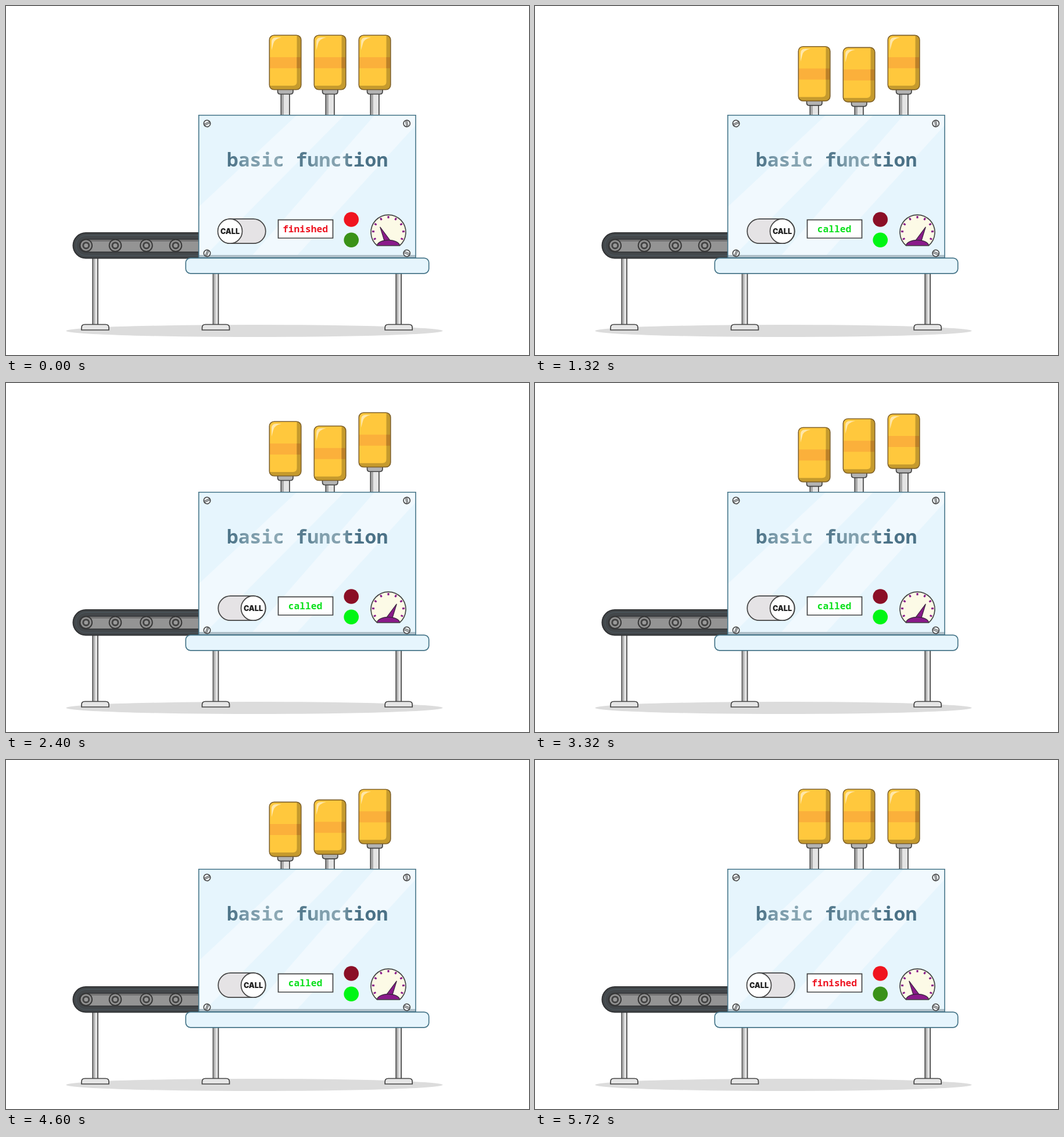
An HTML page for the animation above (6360 ms loop, 900 by 600 pixels).

```html
<!DOCTYPE html>
<html lang="en">
<head>
<meta charset="utf-8">
<title>Basic function machine</title>
<style>
html, body { margin: 0; width: 100%; height: 100%; overflow: hidden; background: #fff; }
svg { display: block; width: 900px; height: 600px; }
.ink { stroke: #444; stroke-width: 1.7; }
.mono { font-family: "Noto Sans Mono", "DejaVu Sans Mono", monospace; font-weight: 700; }
.call { font: 900 12.6px Inter, "Liberation Sans", sans-serif; fill: #222; }
.mid { text-anchor: middle; }
</style>
</head>
<body>
<svg viewBox="0 0 900 600" xmlns="http://www.w3.org/2000/svg">
  <defs>
    <linearGradient id="sheen" gradientUnits="userSpaceOnUse" x1="381" x2="657" y1="250" y2="250">
      <stop offset="0" stop-color="#4b7287"/>
      <stop offset=".06" stop-color="#587d90"/>
      <stop offset=".1" stop-color="#7798a8"/>
      <stop offset=".32" stop-color="#8eaab6"/>
      <stop offset=".36" stop-color="#547a8d"/>
      <stop offset=".5" stop-color="#587d90"/>
      <stop offset=".56" stop-color="#7f9eac"/>
      <stop offset=".72" stop-color="#86a3b0"/>
      <stop offset=".77" stop-color="#4b7287"/>
    </linearGradient>
    <clipPath id="panelClip"><path d="M332 188H705V433H332Z"/></clipPath>
    <clipPath id="dialClip"><path d="M620 350H700V412H620Z"/></clipPath>
    <clipPath id="canClip"><rect x="453" y="50" width="55" height="94" rx="8"/></clipPath>

    <g id="piston">
      <rect class="ink" x="473.3" y="150" width="14.6" height="80" fill="#e4e4e4"/>
      <path d="M474 151h4v78h-4z" fill="#aaa"/>
      <path class="ink" d="M467.5 143h26.500v4q0 4.500-4.500 4.500h-17.500q-4.500 0-4.500-4.500z" fill="#b3b3b3"/>
      <g clip-path="url(#canClip)">
        <path d="M453 50h55v94h-55z" fill="#ffc83d"/>
        <path d="M453 88h55v19h-55z" fill="#fbb03b"/>
        <path d="M500.500 50h7.500v94h-55v-7h41q6.500 0 6.500-6.500z" fill="#c59a2d"/>
        <path d="M500.500 88h7.500v19h-7.500z" fill="#bd8128"/>
        <path d="M457 76v-14q0-8 8-8h9q-13 3-14 11z" fill="#ffe7a8"/>
      </g>
      <rect x="453.300" y="50.300" width="54.500" height="93.500" rx="8" fill="none" stroke="#7f612a" stroke-width="1.6"/>
    </g>

    <g id="foot">
      <path class="ink" d="M-23.500 10v-4q0-5.500 5.500-5.500h36q5.500 0 5.500 5.500v4z" fill="#e6e6e6"/>
    </g>
    <g id="leg">
      <path class="ink" d="M-4.500-90h9V1h-9z" fill="#e3e3e3"/>
      <path d="M-3.600-90h3V0h-3z" fill="#b2b2b2"/>
      <use href="#foot"/>
    </g>
    <g id="roller">
      <circle r="10.300" fill="#929292" stroke="#393939" stroke-width="2"/>
      <circle r="5" fill="#999" stroke="#444" stroke-width="3"/>
    </g>
    <g id="screw">
      <circle r="5.700" fill="#eef3f6" stroke="#444" stroke-width="1.600"/>
      <path d="M-5-1.100H5M-5 1.100H5" stroke="#444" stroke-width="1.100"/>
    </g>
  </defs>

  <ellipse cx="427.500" cy="558.500" rx="324" ry="10.500" fill="#dcdcdc"/>

  <path class="ink" d="M149.300 430h8.700v118h-8.700z" fill="#e3e3e3"/>
  <path d="M150.200 430h3v117h-3z" fill="#b2b2b2"/>
  <use href="#foot" x="153.500" y="547"/>
  <use href="#leg" x="361" y="547"/>
  <use href="#leg" x="675.700" y="547"/>

  <rect x="115.500" y="390" width="250" height="43.500" rx="21.700" fill="#43474a" stroke="#303234" stroke-width="2"/>
  <rect x="120.500" y="394.500" width="250" height="34.500" rx="17" fill="none" stroke="#4d5960" stroke-width="1"/>
  <rect x="126.500" y="401" width="250" height="22" rx="11" fill="#949494" stroke="#303234" stroke-width="1.600"/>
  <path d="M138 402h200v3h-200z" fill="#757575"/>
  <use href="#roller" x="137.800" y="411.700"/>
  <use href="#roller" x="188" y="411.700"/>
  <use href="#roller" x="241.500" y="411.700"/>
  <use href="#roller" x="292" y="411.700"/>

  <use class="piston" href="#piston"/>
  <use class="piston" href="#piston" x="77"/>
  <use class="piston" href="#piston" x="154"/>

  <g clip-path="url(#panelClip)">
    <path d="M332 188H705V433H332Z" fill="#e6f5fd"/>
    <path d="M500 188H582L332 440V345ZM634 188H705V205L497 433H420Z" fill="#f1f9fe"/>
    <path d="M332 428H705V433H332Z" fill="#aebfc8"/>
  </g>
  <path d="M331.700 187.700H705V433H331.700Z" fill="none" stroke="#457488" stroke-width="1.600"/>
  <rect x="309.300" y="433.300" width="418.400" height="26.500" rx="8" fill="#e6f5fd" stroke="#457488" stroke-width="1.700"/>

  <use href="#screw" transform="translate(346 202) rotate(-25)"/>
  <use href="#screw" transform="translate(689.700 202) rotate(78)"/>
  <use href="#screw" transform="translate(346 425) rotate(-68)"/>
  <use href="#screw" transform="translate(689.700 425) rotate(22)"/>

  <text class="mono" x="380" y="275.500" font-size="33" fill="url(#sheen)">basic function</text>

  <rect class="ink" x="365.200" y="366.200" width="81.600" height="42" rx="21" fill="#e5e3e5"/>
  <g id="knob">
    <circle class="ink" cx="385.500" cy="387.200" r="21" fill="#fff"/>
    <text class="call mid" x="385.500" y="391.700">CALL</text>
  </g>

  <path class="ink" d="M468.500 367.700H562.500V399H468.500Z" fill="#fff"/>
  <text id="status" class="mono mid" x="515" y="389" font-size="16.200"></text>

  <circle id="red" cx="594.200" cy="367" r="12.800"/>
  <circle id="green" cx="594.200" cy="402.300" r="12.800"/>

  <path d="M638.700 412A30 30 0 1 1 677.300 412Z" fill="#fcfae6"/>
  <g id="ticks" fill="#8a1a8a"></g>
  <g clip-path="url(#dialClip)">
    <path id="needle" d="M658 376.500L663.500 408H652.500Z" fill="#8a1a8a" stroke="#3d2440" stroke-width="1.200"/>
    <ellipse cx="658" cy="412.500" rx="19.500" ry="10" fill="#8a1a8a" stroke="#3d2440" stroke-width="1.300"/>
  </g>
  <path class="ink" d="M638.700 412A30 30 0 1 1 677.300 412Z" fill="none"/>
</svg>
<script>
const LOOP = 6360, CYCLES = 4, TRAVEL = 27;
const $ = id => document.getElementById(id);
const pistons = document.querySelectorAll('.piston');
const lags = [0, 1 / 3, -1 / 3];

for (let a = -116; a <= 116; a += 29) {
  $('ticks').insertAdjacentHTML('beforeend',
    `<rect x="656.5" y="361" width="3" height="4" transform="rotate(${a} 658 389)"/>`);
}

const clamp = (v, lo, hi) => Math.min(hi, Math.max(lo, v));
const ease = (t, start, length) => (1 - Math.cos(Math.PI * clamp((t - start) / length, 0, 1))) / 2;
// Rises at the first time, falls back at the second.
const pulse = (t, on, off, length) => ease(t, on, length) - ease(t, off, length);
const mix = (a, b, k) => `rgb(${a.map((v, i) => Math.round(v + (b[i] - v) * k))})`;

// The stroke rate drops slightly over the run.
function phase(t) {
  const u = (t - 3100) / 1000;
  return 2.36 + 0.8955 * u - 0.028 * u * u;
}

function draw(t) {
  pistons.forEach((p, i) => {
    const turn = clamp(phase(t) - lags[i], 0, CYCLES);
    p.setAttribute('transform', `translate(0 ${TRAVEL * Math.sin(Math.PI * turn) ** 2})`);
  });
  $('knob').setAttribute('transform', `translate(${40 * pulse(t, 80, 4960, 440)} 0)`);
  $('needle').setAttribute('transform', `rotate(${-27 + 54 * pulse(t, 360, 5080, 500)} 658 408)`);

  const called = t >= 440 && t < 5080;
  $('status').textContent = called ? 'called' : 'finished';
  $('status').setAttribute('fill', called ? '#0be01c' : '#ee1522');

  const lit = pulse(t, 360, 5020, 160);
  $('red').setAttribute('fill', mix([240, 20, 30], [139, 15, 38], lit));
  $('green').setAttribute('fill', mix([58, 146, 24], [0, 246, 20], lit));
}

function tick() {
  draw(performance.now() % LOOP);
  requestAnimationFrame(tick);
}
tick();
</script>
</body>
</html>
```
